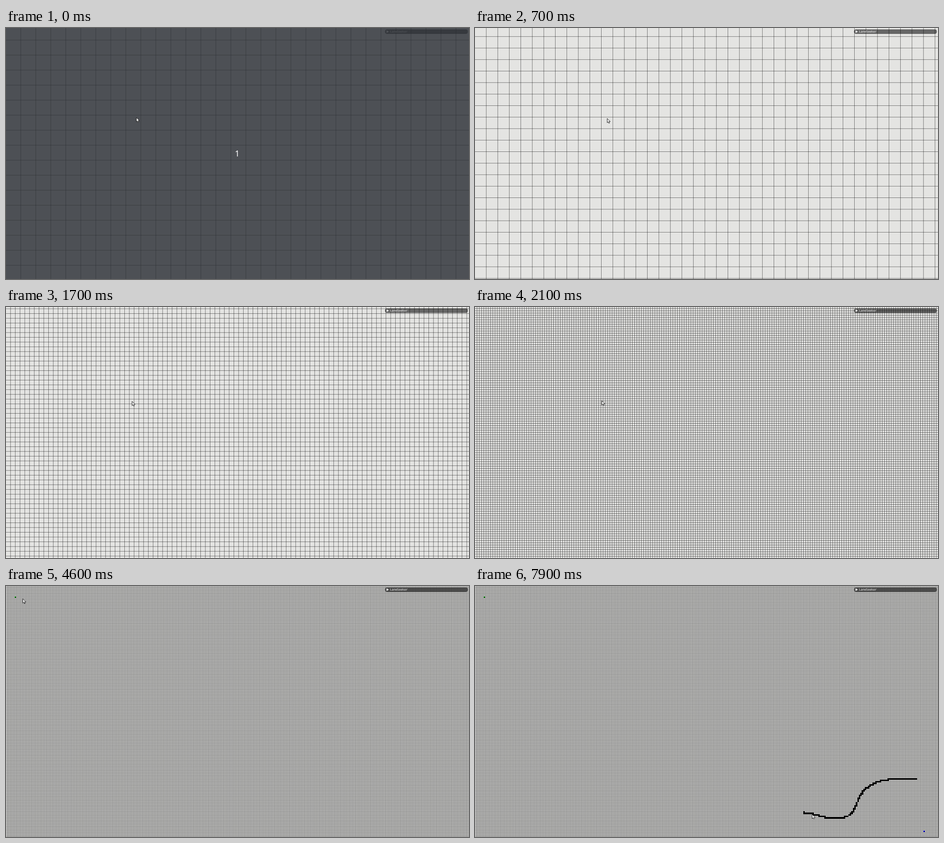
Animation, 1017 px wide and 551 px high, one loop 8000 ms. Source, as an HTML page:

```html
<!DOCTYPE html>
<html lang="en">
<head>
<meta charset="utf-8">
<title>Grid</title>
<style>
  html, body { margin: 0; width: 100%; height: 100%; overflow: hidden; background: #e4e4e2; }
  svg { display: block; width: 1017px; height: 551px; }
  .cell { shape-rendering: crispEdges; }
</style>
</head>
<body>
<svg viewBox="0 0 1017 551" xmlns="http://www.w3.org/2000/svg">
  <rect width="1017" height="551" fill="#e4e4e2"/>
  <path id="halo" fill="none" stroke="#fff" stroke-opacity=".4" stroke-width="2.4"/>
  <path id="grid" fill="none" stroke="#3c3c3b" stroke-width=".75"/>
  <path id="start" class="cell" fill="#008000"/>
  <path id="goal" class="cell" fill="#0000c8"/>
  <path id="trail" class="cell" fill="#000"/>
  <rect x="832.5" y="3" width="182" height="10" rx="4.5" fill="#000" fill-opacity=".55"/>
  <path d="M836 5.2L841 8L836 10.8Z" fill="#fff"/>
  <text x="843.7" y="10.4" font-family="'DejaVu Sans Mono', monospace" font-size="6.4" fill="#fff">LaneSeeker</text>
  <g id="countdown">
    <rect width="1017" height="551" fill="#2c3036" fill-opacity=".82"/>
    <text x="508" y="282" text-anchor="middle" font-family="'Noto Sans', sans-serif" font-size="18" fill="#fff">1</text>
  </g>
  <path id="cursor" d="M.4 .6V10L2.6 8L4 11.2L5.6 10.5L4.3 7.4H7.1Z" fill="#f2f2f2" stroke="#111" stroke-width=".9"/>
</svg>
<script>
const W = 1017, H = 551, LOOP = 8000, STEP = 100;
const SCALE = 0.5494, OX = -0.5, OY = -6.5, FINE = 6 * SCALE;
const DRAW_START = 6800, DRAW_END = 7900;
const $ = id => document.getElementById(id);

// [time, cell size]
const zoom = [[0, 60], [700, 46], [1300, 28], [2100, 9], [2400, 6]];

// [time, x, y]
const pointer = [[0, 286, 196], [700, 290, 198], [1300, 275, 208], [2100, 278, 205],
  [2400, 260, 196], [2700, 226, 183], [2900, 82, 73], [3300, 28, 28], [4200, 16, 22],
  [4600, 36.5, 27.5], [4700, 755, 373], [5300, 985, 537], [5700, 986, 538],
  [5900, 920, 511], [6300, 456, 252], [6800, 970, 423]];

const stroke = document.createElementNS("http://www.w3.org/2000/svg", "path");
stroke.setAttribute("d", "M970 423.6H925C870 426 850 450 842 470S828 507 805 509.5" +
  "H778C764 508 748 499.5 723 498.8V496");
const total = stroke.getTotalLength();

// Linear interpolation between key points
function mix(keys, t) {
  const i = keys.findIndex(k => k[0] > t);
  if (i < 0) return keys[keys.length - 1].slice(1);
  const a = keys[i - 1], b = keys[i], f = (t - a[0]) / (b[0] - a[0]);
  return a.slice(1).map((v, j) => v + (b[j + 1] - v) * f);
}

function gridPath(p) {
  let d = "";
  for (let x = p + OX; x < W; x += p) d += `M${x.toFixed(2)} 0V${H}`;
  for (let y = p + OY; y < H; y += p) d += `M0 ${y.toFixed(2)}H${W}`;
  return d;
}

function cellPath(col, row) {
  const x = k => Math.floor(k * FINE + OX), y = k => Math.floor(k * FINE + OY);
  return `M${x(col)} ${y(row)}H${x(col + 1)}V${y(row + 1)}H${x(col)}Z`;
}

// Fills every cell the stroke has touched so far
function trailPath(reach) {
  const cells = new Set();
  for (let s = 0; s <= reach; s += 0.5) {
    const q = stroke.getPointAtLength(s);
    cells.add(cellPath(Math.floor((q.x - OX) / FINE), Math.floor((q.y - OY) / FINE)));
  }
  return [...cells].join("");
}

$("start").setAttribute("d", cellPath(6, 9));
$("goal").setAttribute("d", cellPath(299, 165));

const show = (id, on) => $(id).setAttribute("visibility", on ? "visible" : "hidden");

function render(t) {
  const lines = gridPath(Math.round(mix(zoom, t)[0]) * SCALE);
  $("halo").setAttribute("d", lines);
  $("grid").setAttribute("d", lines);
  show("countdown", t < 100);
  show("start", t >= 4200);
  show("goal", t >= 5600);

  let [x, y] = mix(pointer, t), trail = "";
  if (t > DRAW_START) {
    const u = (t - DRAW_START) / (DRAW_END - DRAW_START);
    const reach = total * u ** 1.6;
    trail = trailPath(reach);
    // The pointer falls behind as the stroke speeds up
    ({ x, y } = stroke.getPointAtLength(reach - 20 * u ** 8));
  }
  $("trail").setAttribute("d", trail);
  $("cursor").setAttribute("transform", `translate(${x} ${y})`);
}

const t0 = performance.now();
let shown = -1;
function tick() {
  const t = Math.floor(((performance.now() - t0) % LOOP) / STEP) * STEP;
  if (t !== shown) render(shown = t);
  requestAnimationFrame(tick);
}
tick();
</script>
</body>
</html>
```
